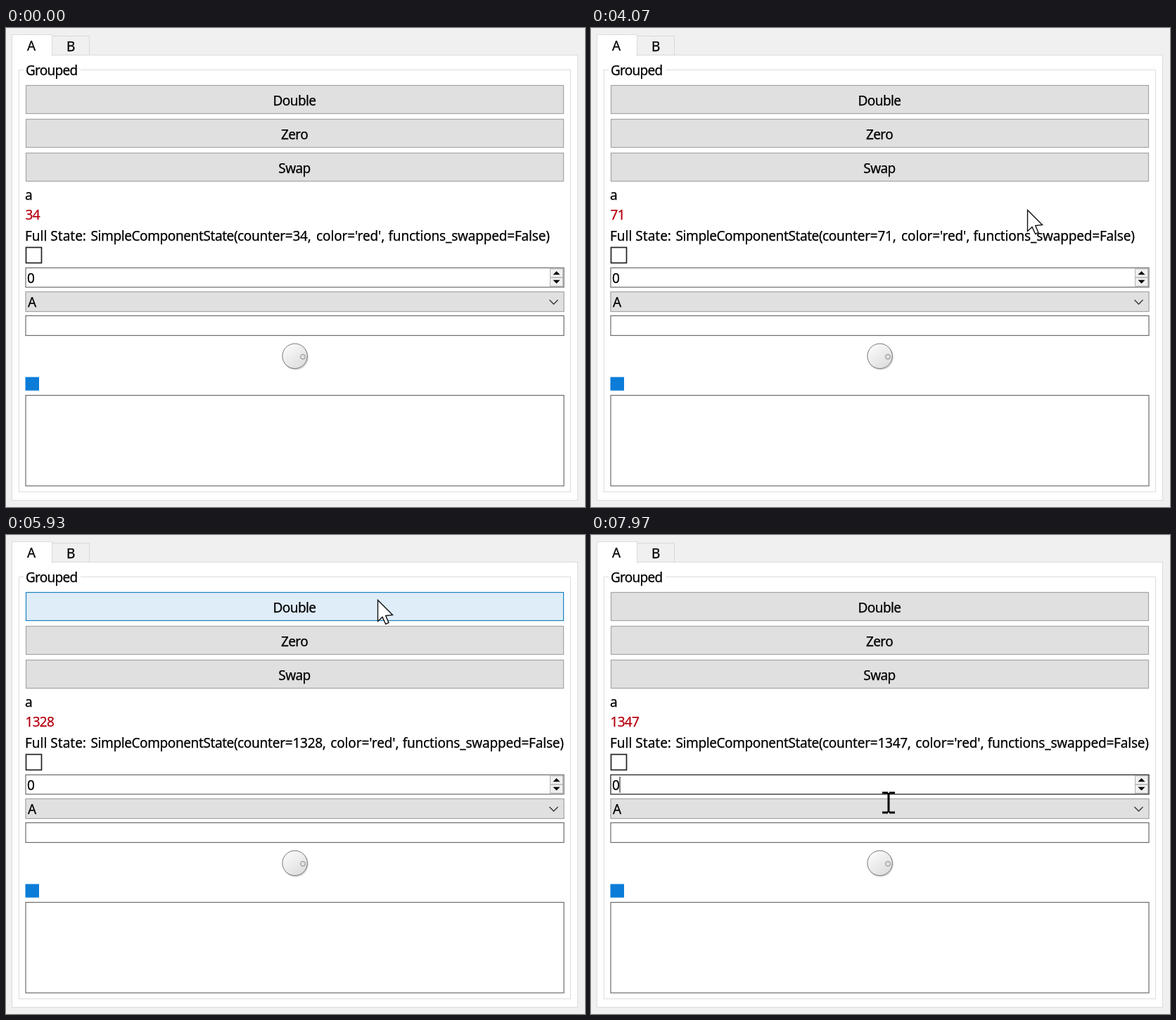
Write an HTML page with a canvas that moves like this. It is 823 by 680 pixels and loops after 8000 ms.

```html
<!DOCTYPE html>
<html lang="en">
<head>
<meta charset="utf-8">
<title>Widget demo</title>
<style>
  html, body { margin: 0; width: 100%; height: 100%; overflow: hidden; background: #f0f0f0; }
  canvas { display: block; }
</style>
</head>
<body>
<canvas id="stage" width="823" height="680"></canvas>
<script>
const ctx = document.getElementById('stage').getContext('2d');
const LOOP = 8000;
const CLICKS = [5150, 5480, 5590, 5700];
const BLUE = [30, 130, 195];
const FACE = [225, 224, 225], EDGE = [165, 165, 165];
const HOVER = [229, 240, 250], PRESSED = [208, 228, 243];
const LEFT = 27.5, RIGHT = 793.5;

// Pointer way points: time, x, y
const PATH = [
  [500, 826, 205], [860, 700, 238], [1080, 622, 258], [2600, 622, 258], [2900, 620, 258],
  [4240, 620, 258], [4600, 528, 92], [6060, 528, 92], [6680, 405, 362],
  [6880, 404, 381], [7400, 404, 381], [7720, 420, 356], [7800, 423, 358], [7940, 423, 380]
];

const clamp = v => Math.max(0, Math.min(1, v));
const ramp = (t, start, length) => clamp((t - start) / length);
const smooth = u => u * u * (3 - 2 * u);
const mix = (a, b, u) => a.map((v, i) => v + (b[i] - v) * u);
const rgb = c => `rgb(${c.map(Math.round).join()})`;

function box(x1, y1, x2, y2, fill, edge, width = 1) {
  ctx.fillStyle = fill;
  ctx.fillRect(x1, y1, x2 - x1, y2 - y1);
  if (!edge) return;
  ctx.strokeStyle = edge;
  ctx.lineWidth = width;
  ctx.strokeRect(x1 + 0.5, y1 + 0.5, x2 - x1 - 1, y2 - y1 - 1);
}

function text(s, x, y, { color = '#000', spacing = -0.4, align = 'left' } = {}) {
  ctx.font = '19px "Noto Sans", "Open Sans", sans-serif';
  ctx.letterSpacing = spacing + 'px';
  ctx.textAlign = align;
  ctx.fillStyle = ctx.strokeStyle = color;
  ctx.lineWidth = 0.25;
  ctx.fillText(s, x, y);
  ctx.strokeText(s, x, y);
}

function shape(points, fill, stroke, width = 1, closed = true) {
  ctx.beginPath();
  points.forEach(([x, y]) => ctx.lineTo(x, y));
  if (closed) ctx.closePath();
  if (fill) { ctx.fillStyle = fill; ctx.fill(); }
  if (stroke) { ctx.strokeStyle = stroke; ctx.lineWidth = width; ctx.stroke(); }
}

const ticks = t => Math.floor(t * 0.0092 + 0.1);

// Counts steadily and doubles on every click
function counter(t) {
  let value = 34, seen = 0;
  for (const c of CLICKS) {
    if (t < c) break;
    value = (value + ticks(c) - seen) * 2;
    seen = ticks(c);
  }
  return value + ticks(t) - seen;
}

function pressLevel(t) {
  return Math.max(...CLICKS.map(c => t < c ? ramp(t, c - 80, 60) : 1 - ramp(t, c, 320)));
}

function button(label, y, hover = 0, press = 0) {
  const fill = mix(mix(FACE, HOVER, hover), PRESSED, press);
  box(28, y, 793, y + 41, rgb(fill), rgb(mix(EDGE, BLUE, hover)), 1.2);
  text(label, 410, y + 29, { align: 'center', spacing: -0.6 });
}

function frameAndTabs() {
  box(0, 0, 823, 680, '#f0f0f0');
  box(8, 38, 813, 671, '#fff', '#dcdcdc');
  box(65, 11, 119, 39, '#f0f0f0', '#d9d9d9');
  box(8, 9, 66, 40, '#fff', '#dcdcdc');
  box(9, 38, 65, 41, '#fff');
  text('A', 30, 32);
  text('B', 86, 33);
  box(18, 59, 803, 659, '#fff', '#dcdcdc');
  box(25, 58, 106, 61, '#fff');
  text('Grouped', 28, 67, { spacing: -0.75 });
}

function stateLine(t) {
  const value = String(counter(t));
  const shift = (value.length - 2) * 10.1;
  const y = 301.5;
  text('a', 27, 244);
  text(value, 27.5, 272, { color: '#b70010', spacing: -0.7 });
  text('Full State:', 27, y, { spacing: 0 });
  text('SimpleComponentState(', 120.5, y);
  text(`counter=${value},`, 329, y, { spacing: -0.25 });
  text("color='red',", 441 + shift, y, { spacing: -0.12 });
  text('functions_swapped=False)', 543.5 + shift, y, { spacing: -0.2 });
}

function field(y1, y2, edge = '#6c6c6c') {
  box(LEFT, y1, RIGHT, y2, '#fff', edge, 1.2);
}

function spinBox(t) {
  field(340, 368.5, rgb(mix([108, 108, 108], [25, 25, 25], ramp(t, 6580, 150))));
  text('0', 30, 362);
  if (t >= 7760) box(40.5, 343, 41.5, 366, '#000');
  for (const [y, dir] of [[341.5, -1], [354, 1]]) {
    box(773, y, 792, y + 13, '#f0f0f0', '#b4b4b4');
    const mid = y + 6.2;
    shape([[777.5, mid - 2.5 * dir], [787.5, mid - 2.5 * dir], [782.5, mid + 2.5 * dir]], '#000');
  }
}

function comboBox(t) {
  const hover = ramp(t, 6740, 150) * (1 - ramp(t, 7580, 150));
  const fill = mix(FACE, [228, 236, 246], hover);
  box(LEFT, 374, RIGHT, 403, rgb(fill), rgb(mix(EDGE, BLUE, hover)), 1.2);
  text('A', 31, 396);
  shape([[772.5, 386], [778.5, 392], [784.5, 386]], null, '#333', 1.3, false);
}

function disc(x, y, r, fill, edge) {
  ctx.beginPath();
  ctx.arc(x, y, r, 0, Math.PI * 2);
  ctx.fillStyle = fill;
  ctx.fill();
  if (!edge) return;
  ctx.strokeStyle = edge;
  ctx.lineWidth = 1;
  ctx.stroke();
}

function dial() {
  const shade = ctx.createLinearGradient(398, 450, 423, 482);
  shade.addColorStop(0, '#fbfbfb');
  shade.addColorStop(1, '#dcdcdc');
  disc(411.6, 467.2, 18.3, '#d8d8d8');
  disc(410.6, 465.8, 17.7, shade, '#777');
  disc(422, 466.8, 3.4, '#e2e2e2', '#888');
}

function pointerAt(t) {
  const next = PATH.findIndex(p => p[0] > t);
  if (next === 0) return null;
  if (next < 0) return PATH[PATH.length - 1].slice(1);
  const a = PATH[next - 1], b = PATH[next];
  return mix(a, b, smooth(ramp(t, a[0], b[0] - a[0]))).slice(1);
}

function arrow() {
  shape([[0.5, 0.5], [0.5, 30.5], [7, 24.5], [11.7, 34.5], [16, 32.5], [11.7, 22.5], [21.5, 21.5]],
    '#fff', '#111', 1.4);
}

function beam() {
  box(-1.5, -14, 1.5, 14, '#000');
  for (const y of [-15.5, 12.5]) {
    box(-9, y, -1, y + 3, '#000');
    box(1, y, 9, y + 3, '#000');
  }
}

function pointer(t) {
  const at = pointerAt(t);
  if (!at) return;
  ctx.save();
  ctx.translate(...at.map(Math.round));
  const overSpin = t > 7640 || (t > 6630 && t < 6790);
  if (overSpin) beam(); else arrow();
  ctx.restore();
}

function draw(t) {
  frameAndTabs();
  const hover = ramp(t, 4500, 150) * (1 - ramp(t, 6270, 180));
  button('Double', 81, hover, pressLevel(t));
  button('Zero', 129);
  button('Swap', 177);
  stateLine(t);
  box(28, 311, 51, 334, '#fff', '#222', 1.7);
  spinBox(t);
  comboBox(t);
  field(408, 437);
  dial();
  box(27.5, 495.5, 47, 514.7, '#0b7dd8');
  field(521, 650.5);
  pointer(t);
}

const start = performance.now();
function loop() {
  draw((performance.now() - start) % LOOP);
  requestAnimationFrame(loop);
}
loop();
</script>
</body>
</html>
```
